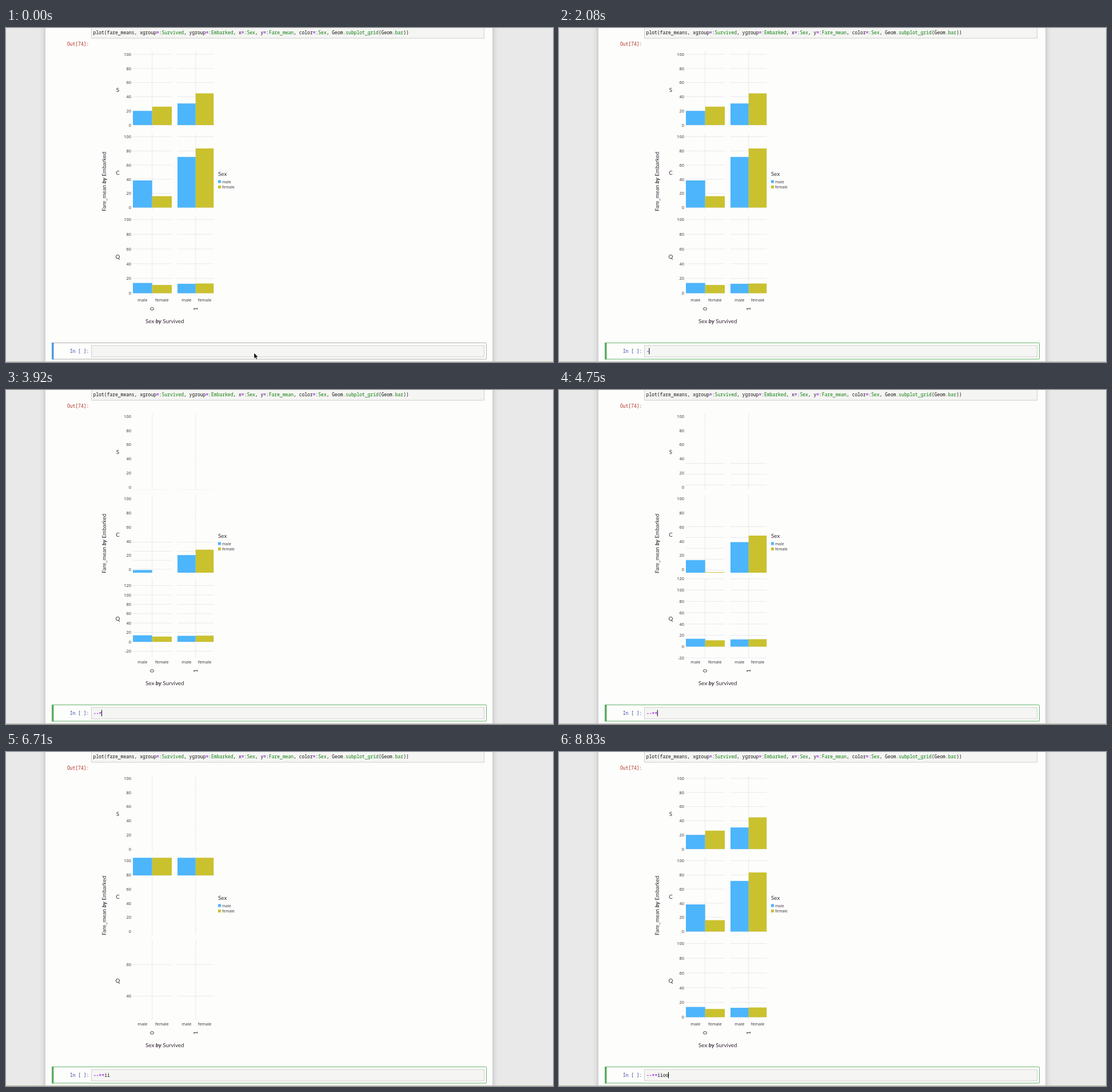
These frames come from a looping animation (957 px wide and 585 px high, 8.87 s). An HTML page:

```html
<!DOCTYPE html>
<html lang="en">
<head>
<meta charset="utf-8">
<title>Subplot zoom by keyboard</title>
<style>
  html, body { margin: 0; width: 100%; height: 100%; overflow: hidden; background: #e9e9e9; }
  #stage { position: relative; width: 957px; height: 585px; overflow: hidden; }
  #page { position: absolute; left: 69px; top: -30px; width: 782px; height: 645px;
          background: #fdfdfc; box-shadow: 0 0 10px rgba(87, 87, 87, .35); }
  svg { position: absolute; left: 0; top: 0; }
  text { white-space: pre; }
  .code { font: 8px "Noto Sans Mono", "DejaVu Sans Mono", monospace; fill: #111; }
  .op { fill: #a020f0; font-weight: bold; }
  .sym { fill: #077a07; }
  .title { font: 9.8px Lato, "Open Sans", sans-serif; fill: #362a35; }
  .title tspan { font-weight: bold; font-style: italic; }
  .tick { font: 7.4px "Noto Sans", "Open Sans", sans-serif; fill: #453b45; }
  .key { font-size: 6.8px; }
  .mid { text-anchor: middle; }
  .end { text-anchor: end; }
  .grid { stroke: #d3d3de; stroke-width: .8; stroke-dasharray: 1.5 1; vector-effect: non-scaling-stroke; }
  .male { fill: #4db5fb; }
  .female { fill: #cac12f; }
  .box { fill: #f5f5f3; stroke: #cfcfcf; }
  #frame { fill: none; stroke: #b0b0b0; }
  #band { fill: #4a9add; }
  .edit #frame { stroke: #66b56c; }
  .edit #band { fill: #58ae60; }
  .edit #pointer { display: none; }
</style>
</head>
<body>
<div id="stage">
  <div id="page"></div>
  <svg width="957" height="585" viewBox="0 0 957 585">
    <rect class="box" x="149.5" y="-20.5" width="687" height="38.5"/>
    <text class="code" x="152.6" y="-2">set_default_plot_size(12cm, 16cm)</text>
    <text class="code" id="call" x="152.6" y="11.4"></text>
    <text class="code end" x="145.3" y="31" style="fill:#b02a1c">Out[74]:</text>

    <g id="chart"></g>

    <g class="title">
      <text x="244" y="516.5">Sex <tspan>by</tspan> Survived</text>
      <text transform="translate(174.5 321) rotate(-90)">Fare_mean <tspan>by</tspan> Embarked</text>
      <text class="mid" transform="translate(259 492) rotate(-90)">0</text>
      <text class="mid" transform="translate(335.3 492) rotate(-90)">1</text>
      <text x="371" y="259">Sex</text>
    </g>
    <rect class="male" x="371" y="266.5" width="5" height="5"/>
    <rect class="female" x="371" y="276" width="5" height="5"/>
    <text class="tick key" x="378" y="271.7">male</text>
    <text class="tick key" x="378" y="281">female</text>

    <g id="cell">
      <rect id="frame" x="80.5" y="551.5" width="760" height="28.5" rx="1"/>
      <rect id="band" x="80" y="551" width="3.5" height="29.5"/>
      <rect class="box" x="149.5" y="556" width="687" height="20"/>
      <text class="code end" x="145.3" y="569" style="fill:#303f9f">In [ ]:</text>
      <text class="code" x="153" y="569"><tspan class="op" id="ops"></tspan><tspan id="letters"></tspan></text>
      <rect id="caret" y="560.5" width="1" height="11" fill="#000"/>
      <path id="pointer" d="M434 569v10l2.3-2 1.6 3.4 1.6-.8-1.6-3.2h3.1z" fill="#000" stroke="#fff" stroke-width=".6"/>
    </g>
    <rect y="584" width="957" height="1" fill="#b9b9a6"/>
  </svg>
</div>
<script>
const LOOP = 8870, CLICK = 600, BLINK = 530, LAG = 40, ZOOM_TIME = 200;
const CHAR = 4.8, CENTER = 400;
const KEYS = "--++iioo";
const KEY_TIMES = [2060, 3060, 3880, 4730, 5300, 6000, 6800, 7550];
const SCALES = { "-2": 0.636, "-1": 0.767, 0: 1, 1: 1.415, 2: 2.151 };

const COLUMNS = [[222, 255.7, 290], [300, 331.8, 363.3]];
const PANELS = [
  { name: "S", top: 41, bottom: 174.5, zero: 170, unit: 1.24, labelY: 111.7, means: [20, 26, 30.5, 44.8] },
  { name: "C", top: 185.3, bottom: 320, zero: 314.5, unit: 1.24, labelY: 256.5, means: [38.3, 16.1, 71.5, 83.5] },
  { name: "Q", top: 330, bottom: 469.8, zero: 464.5, unit: 1.29, labelY: 404, means: [13.9, 11.2, 12.8, 13.2] }
];

const $ = id => document.getElementById(id);

function add(parent, tag, attrs, text) {
  const node = document.createElementNS("http://www.w3.org/2000/svg", tag);
  for (const name in attrs) node.setAttribute(name, attrs[name]);
  if (text !== undefined) node.textContent = text;
  return parent.appendChild(node);
}

function highlight(node, source) {
  for (const part of source.split(/(=|:\w+|\.\w+)/)) {
    const kind = part === "=" ? "op" : /^[:.]/.test(part) ? "sym" : "";
    add(node, "tspan", { class: kind }, part);
  }
}

const zoomed = [], axis = [];

function buildPanel(p) {
  const chart = $("chart");
  const last = p.name === "Q";
  const clip = add(chart, "clipPath", { id: "clip" + p.name });
  add(clip, "rect", { x: 200, y: p.top, width: 180, height: p.bottom - p.top });
  for (const [, mid] of COLUMNS)
    add(chart, "line", { class: "grid", x1: mid, x2: mid, y1: p.top, y2: p.bottom });

  const view = add(chart, "g", { "clip-path": `url(#clip${p.name})` });
  const body = add(view, "g", {});
  zoomed.push(body);
  for (let v = last ? -60 : 0; v <= (last ? 160 : 100); v += 20) {
    const y = p.zero - v * p.unit;
    for (const [left, , right] of COLUMNS)
      add(body, "line", { class: "grid", x1: left, x2: right, y1: y, y2: y });
    const label = add(chart, "text", { class: "tick end", x: 219, y: y + 2.7 }, v);
    if (last) axis.push({ label, y, top: p.top, bottom: p.bottom });
  }
  p.means.forEach((mean, i) => {
    const edges = COLUMNS[i >> 1], side = i % 2, h = mean * p.unit;
    add(body, "rect", {
      class: side ? "female" : "male",
      x: edges[side], width: edges[side + 1] - edges[side], y: p.zero - h, height: h
    });
  });
  add(chart, "text", { class: "title mid", x: 195.4, y: p.labelY }, p.name);
}

function build() {
  highlight($("call"), "plot(fare_means, xgroup=:Survived, ygroup=:Embarked, x=:Sex, y=:Fare_mean, " +
    "color=:Sex, Geom.subplot_grid(Geom.bar))");
  PANELS.forEach(buildPanel);
  for (const [a, b, c] of COLUMNS) {
    add($("chart"), "text", { class: "tick mid", x: (a + b) / 2, y: 479 }, "male");
    add($("chart"), "text", { class: "tick mid", x: (b + c) / 2, y: 479 }, "female");
  }
}

function scaleAt(t) {
  let level = 0, scale = 1;
  KEY_TIMES.forEach((start, i) => {
    const done = Math.min(1, Math.max(0, (t - start - LAG) / ZOOM_TIME));
    if (!done) return;
    level += "+i".includes(KEYS[i]) ? 1 : -1;
    scale += (SCALES[level] - scale) * done;
  });
  return scale;
}

function drawChart(k) {
  const move = y => CENTER + (y - CENTER) * k;
  for (const body of zoomed)
    body.setAttribute("transform", `matrix(1 0 0 ${k} 0 ${CENTER * (1 - k)})`);
  for (const { label, y, top, bottom } of axis) {
    const at = move(y);
    label.setAttribute("y", at + 2.7);
    label.style.display = at >= top && at <= bottom ? "" : "none";
  }
}

function drawCell(t) {
  const count = KEY_TIMES.filter(k => k <= t).length;
  const since = t - (count ? KEY_TIMES[count - 1] : CLICK);
  const typed = KEYS.slice(0, count);
  $("cell").setAttribute("class", t >= CLICK ? "edit" : "");
  $("ops").textContent = typed.slice(0, 4);
  $("letters").textContent = typed.slice(4);
  $("caret").setAttribute("x", 153 + count * CHAR - 0.4);
  $("caret").style.display = since >= 0 && Math.floor(since / BLINK) % 2 === 0 ? "" : "none";
}

build();
const begin = performance.now();
function tick() {
  const t = (performance.now() - begin) % LOOP;
  drawChart(scaleAt(t));
  drawCell(t);
  requestAnimationFrame(tick);
}
tick();
</script>
</body>
</html>
```
